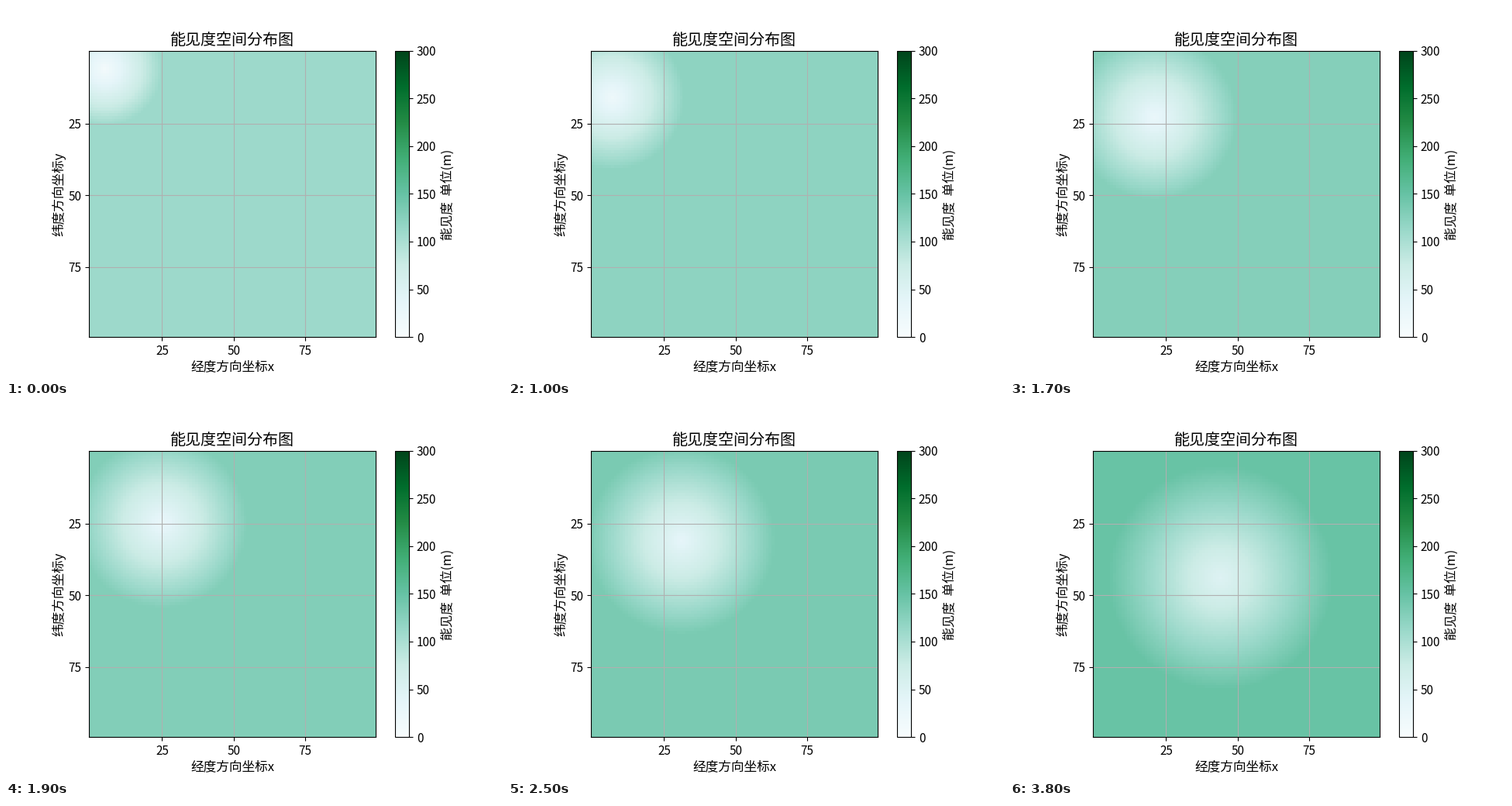
Animation, 640 px wide and 480 px high, one loop 3.9 s. Source, as a matplotlib script:

```python
import matplotlib.pyplot as plt
import numpy as np
from matplotlib.animation import FuncAnimation

FRAMES = 39
INTERVAL = 100
GRID = 100

plt.rcParams["font.family"] = ["Noto Sans CJK JP"]
plt.rcParams["font.size"] = 12

rows, cols = np.mgrid[0:GRID, 0:GRID]


def fog_center(step):
    """Column and row of the fog's core."""
    x = np.interp(step, [0, 10, 19, 38], [5, 7, 25, 44])
    return x, step + 6


def visibility(step):
    """Cone of low visibility that spreads and thins out."""
    x, y = fog_center(step)
    radius = 20 + 0.5 * step
    dist = np.hypot(cols - x, rows - y)
    return 10 + step + 100 * np.minimum(dist / radius, 1)


fig, ax = plt.subplots(figsize=(6.4, 4.8), dpi=100)
image = ax.imshow(visibility(0), cmap="BuGn", vmin=0, vmax=300,
                  interpolation="nearest")
bar = fig.colorbar(image, ax=ax, ticks=range(0, 301, 50))

ax.set_xticks([25, 50, 75])
ax.set_yticks([25, 50, 75])
ax.grid(True, color="#b0b0b0", linewidth=0.8)
for axes in (ax, bar.ax):
    axes.tick_params(labelsize=11)


def label(x, y, text, size=12, rotation=0):
    """Text centred on a baseline point given in pixels from the top left."""
    fig.text(x / 640, 1 - y / 480, text, fontsize=size, rotation=rotation,
             rotation_mode="anchor", ha="center", va="baseline")


label(291.5, 50, "能见度空间分布图", size=14.4)
label(292, 470, "经度方向坐标x")
label(73, 243, "纬度方向坐标y", rotation=90)
label(575, 243, "能见度  单位(m)", rotation=90)


def update(step):
    image.set_data(visibility(step))
    return (image,)


anim = FuncAnimation(fig, update, frames=FRAMES, interval=INTERVAL,
                     repeat=True, repeat_delay=0, blit=False)
plt.show()
```
